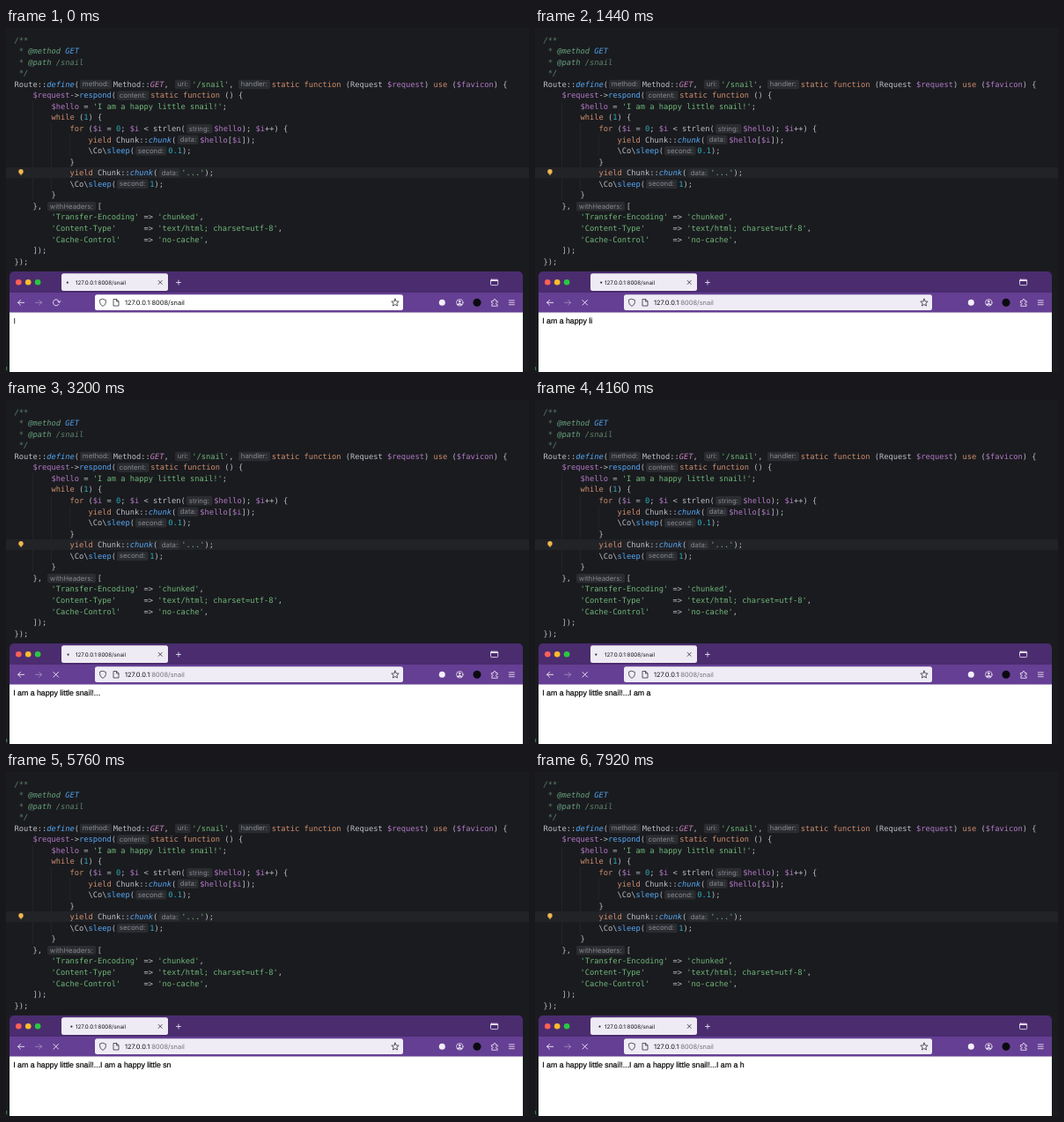
An HTML page that plays this animation: 594x390 px, repeating every 8000 ms.

```html
<!DOCTYPE html>
<html lang="en">
<head>
<meta charset="utf-8">
<title>Streaming response</title>
<style>
html, body { margin: 0; width: 100%; height: 100%; overflow: hidden; background: #1a1b1f; }
svg { display: block; width: 594px; height: 390px; }
text { white-space: pre; text-rendering: geometricPrecision; }
#code { font: 8.72px "DejaVu Sans Mono", "Liberation Mono", monospace; fill: #bcbec4; }
#code .hint { font: 7.8px Inter, sans-serif; fill: #858890; }
.str { fill: #6fb779; }
.var { fill: #b179c4; }
.key { fill: #cf8e6d; }
.num { fill: #2aacb8; }
.call { fill: #56a8f5; }
.static { fill: #56a8f5; font-style: italic; }
.const { fill: #c77dbb; font-style: italic; }
.doc { fill: #5f826b; font-style: italic; }
.tag { fill: #67a37c; }
.verb { fill: #4f9de8; }
.ui { font-family: Inter, sans-serif; fill: #15141a; }
#page { font: 8.78px "Liberation Sans", Arial, sans-serif; fill: #000; stroke: #000; stroke-width: .2; }
.line { fill: none; stroke-linecap: round; stroke-linejoin: round; }
</style>
</head>
<body>
<svg viewBox="0 0 594 390">
  <rect width="594" height="390" fill="#1a1b1f"/>
  <path d="M30.500 83V195M51.500 108V183M72.500 120V145" stroke="#25272b" stroke-width=".8"/>
  <rect y="158" width="594" height="12" fill="#222327"/>
  <g id="bulb">
    <circle cx="17" cy="162.800" r="2.700" fill="#f0b652"/>
    <rect x="15.800" y="164.800" width="2.400" height="1.700" rx=".5" fill="#d9a343"/>
  </g>
  <g id="code"></g>
  <rect y="384" width="1.200" height="4" fill="#2c7a40"/>

  <rect x="4" y="322" width="583" height="68" fill="#fff"/>
  <path d="M4 301V281a5 5 0 0 1 5-5H582a5 5 0 0 1 5 5V301z" fill="#4a2c6f"/>
  <rect x="4" y="300" width="583" height="22.500" fill="#653f93"/>
  <circle cx="14.300" cy="288.300" r="3.300" fill="#fe5f57"/>
  <circle cx="25.200" cy="288.300" r="3.300" fill="#febc2e"/>
  <circle cx="36.100" cy="288.300" r="3.300" fill="#28c840"/>
  <rect x="63" y="278.300" width="121" height="19.700" rx="2.500" fill="#efebf4"/>
  <circle id="dot" cy="288.600" r="1.100" fill="#2c2933"/>
  <text class="ui" x="79" y="290.700" font-size="6.250">127.0.0.1:8008/snail</text>
  <path class="line" stroke="#2b2833" stroke-width=".8" d="M173.200 286.400l4 4m0-4l-4 4"/>
  <path class="line" stroke="#f3eef9" stroke-width=".8" d="M193.500 288.500h5m-2.500-2.500v5"/>
  <g class="line" stroke="#f3eef9" stroke-width=".8">
    <rect x="550.500" y="285.200" width="8.200" height="6.400" rx="1"/>
    <path d="M551 286.200h7.200" stroke-width="1.400"/>
  </g>

  <g class="line" stroke="#f3eef9" stroke-width=".9">
    <path d="M20.600 311.300h-7m3-3l-3 3 3 3"/>
    <path opacity=".4" d="M33.500 311.300h7m-3-3l3 3-3 3"/>
    <path id="reload" d="M60 313.200A3.500 3.500 0 1 1 60.500 310.800M58.700 310l1.800 1.400 1.300-1.900"/>
    <path id="stop" d="M53.900 308.500l5.600 5.600m0-5.600l-5.600 5.600"/>
  </g>
  <rect id="bar" x="101" y="302.300" width="350" height="17.700" rx="2.500"/>
  <g class="line" stroke="#34313c" stroke-width=".8">
    <path d="M110 307.300l3.400 1.200v2.300q0 3-3.400 4.600q-3.400-1.600-3.400-4.600v-2.300z"/>
    <path d="M122.400 307.500h3.300l2.300 2.300v5.200h-5.600zM125.500 307.700v2.300h2.300"/>
    <path id="star"/>
  </g>
  <text class="ui" x="135" y="313.900" font-size="7.450">127.0.0.1<tspan id="path">:8008/snail</tspan></text>
  <circle cx="495.300" cy="311.300" r="3.500" fill="#f3eef9"/>
  <g class="line" stroke="#f3eef9" stroke-width=".8">
    <circle cx="515.300" cy="311.300" r="3.700"/>
    <circle cx="515.300" cy="310.100" r="1.300" fill="#f3eef9" stroke="none"/>
    <path d="M513.300 313.600q2-1.800 4 0" stroke-width="1.300"/>
    <path d="M551.800 309.500h2v-.9a1.200 1.200 0 0 1 2.400 0v.9h2v2h-.8a1 1 0 0 0 0 2h.8v1.800h-6.400v-2h.8a1 1 0 0 0 0-1.800h-.8z"/>
    <path d="M571.300 308.900h6M571.300 311.300h6M571.300 313.700h6"/>
  </g>
  <circle cx="535" cy="311.300" r="4.500" fill="#0b0b0e"/>
  <path id="caret" d="M9.700 329v6.300" stroke="#222" stroke-width=".9"/>
  <text id="page" x="8.200" y="335.100"></text>
</svg>
<script>
const $ = id => document.getElementById(id);
const PITCH = 5.25, LEFT = 9.5;
const esc = s => s.replace(/&/g, '&amp;').replace(/</g, '&lt;');
const span = (cls, s) => `<tspan class="${cls}">${esc(s)}</tspan>`;
const baseline = row => 16.5 + row * 12.56;

const KINDS = ['str', 'var', 'key', 'num', 'static', 'call', 'const'];
const TOKEN = /('[^']*')|(\$\w+)|\b(static|function|while|for|yield|use)\b|\b(\d[\d.]*)|(define|chunk)(?=\()|(respond|sleep)(?=\()|(GET)/g;

function paint(code) {
  let out = '', last = 0;
  for (const m of code.matchAll(TOKEN)) {
    const kind = KINDS[m.slice(1).findIndex(Boolean)];
    out += esc(code.slice(last, m.index)) + span(kind, m[0]);
    last = m.index + m[0].length;
  }
  return out + esc(code.slice(last));
}

const text = (x, row, body) => `<text x="${x}" y="${baseline(row)}">${body}</text>`;

function hint(x, w, row, label) {
  const y = baseline(row);
  return `<rect x="${x}" y="${y - 8}" width="${w}" height="10.4" rx="2" fill="#2a2c30"/>` +
    `<text class="hint" x="${x + 2.8}" y="${y - .3}">${label}</text>`;
}

// Each row: indent in columns, code, then [hint x, width, label, code after it]
const ROWS = [
  [0, 'Route::define(', [84, 36, 'method:', 'Method::GET,'], [192, 17.5, 'uri:', "'/snail',"],
    [264, 36, 'handler:', 'static function (Request $request) use ($favicon) {']],
  [4, '$request->respond(', [126, 36.5, 'content:', 'static function () {']],
  [8, "$hello = 'I am a happy little snail!';"],
  [8, 'while (1) {'],
  [12, 'for ($i = 0; $i < strlen(', [205, 29.5, 'string:', '$hello); $i++) {']],
  [16, 'yield Chunk::chunk(', [195, 23.5, 'data:', '$hello[$i]);']],
  [16, '\\Co\\sleep(', [147, 35.5, 'second:', '0.1);']],
  [12, '}'],
  [12, 'yield Chunk::chunk(', [174, 23.5, 'data:', "'...');"]],
  [12, '\\Co\\sleep(', [126, 35.5, 'second:', '1);']],
  [8, '}'],
  [4, '},', [47, 55, 'withHeaders:', '[']],
  [8, "'Transfer-Encoding' => 'chunked',"],
  [8, "'Content-Type'      => 'text/html; charset=utf-8',"],
  [8, "'Cache-Control'     => 'no-cache',"],
  [4, ']);'],
  [0, '});']
];

let code = [
  '/**',
  ' * ' + span('tag', '@method') + span('verb', ' GET'),
  ' * ' + span('tag', '@path') + ' /snail',
  ' */'
].map((s, row) => text(LEFT, row, `<tspan class="doc">${s}</tspan>`)).join('');

ROWS.forEach(([indent, start, ...parts], i) => {
  const row = i + 4;
  code += text(LEFT + indent * PITCH, row, paint(start));
  for (const [x, w, label, rest] of parts) {
    code += hint(x, w, row, label) + text(x + w + 1.7, row, paint(rest));
  }
});
$('code').innerHTML = code;

const points = Array.from({ length: 10 }, (_, i) => {
  const r = i % 2 ? 2 : 4.4, a = (i / 5 - .5) * Math.PI;
  return (442 + r * Math.cos(a)).toFixed(2) + ' ' + (311.5 + r * Math.sin(a)).toFixed(2);
});
$('star').setAttribute('d', 'M' + points.join('L') + 'z');

const LOOP = 8000, TICK = 80;
const HELLO = 'I am a happy little snail!';
const CHAR = 100, PAUSE = 1000, LEAD = 20;
const CYCLE = HELLO.length * CHAR + PAUSE;

function streamed(t) {
  const at = t + LEAD, done = Math.floor(at / CYCLE);
  const n = Math.floor((at % CYCLE) / CHAR) + 1;
  return (HELLO + '...').repeat(done) + HELLO.slice(0, n) + (n > HELLO.length ? '...' : '');
}

const show = (id, on) => $(id).setAttribute('visibility', on ? 'visible' : 'hidden');

function draw(now) {
  const t = Math.floor((now % LOOP) / TICK) * TICK;
  const loading = t >= TICK;
  show('reload', !loading);
  show('stop', loading);
  show('caret', !loading);
  $('bar').setAttribute('fill', loading ? '#f0ecf5' : '#fff');
  $('path').setAttribute('fill', loading ? '#76727e' : '#15141a');
  $('page').textContent = loading ? streamed(t) : '';
  const swing = Math.cos(2 * Math.PI * (t / 1050 - .37));
  $('dot').setAttribute('cx', (72 + 3.2 * swing).toFixed(2));
}

const begin = performance.now();
function loop() {
  draw(performance.now() - begin);
  requestAnimationFrame(loop);
}
loop();
</script>
</body>
</html>
```
